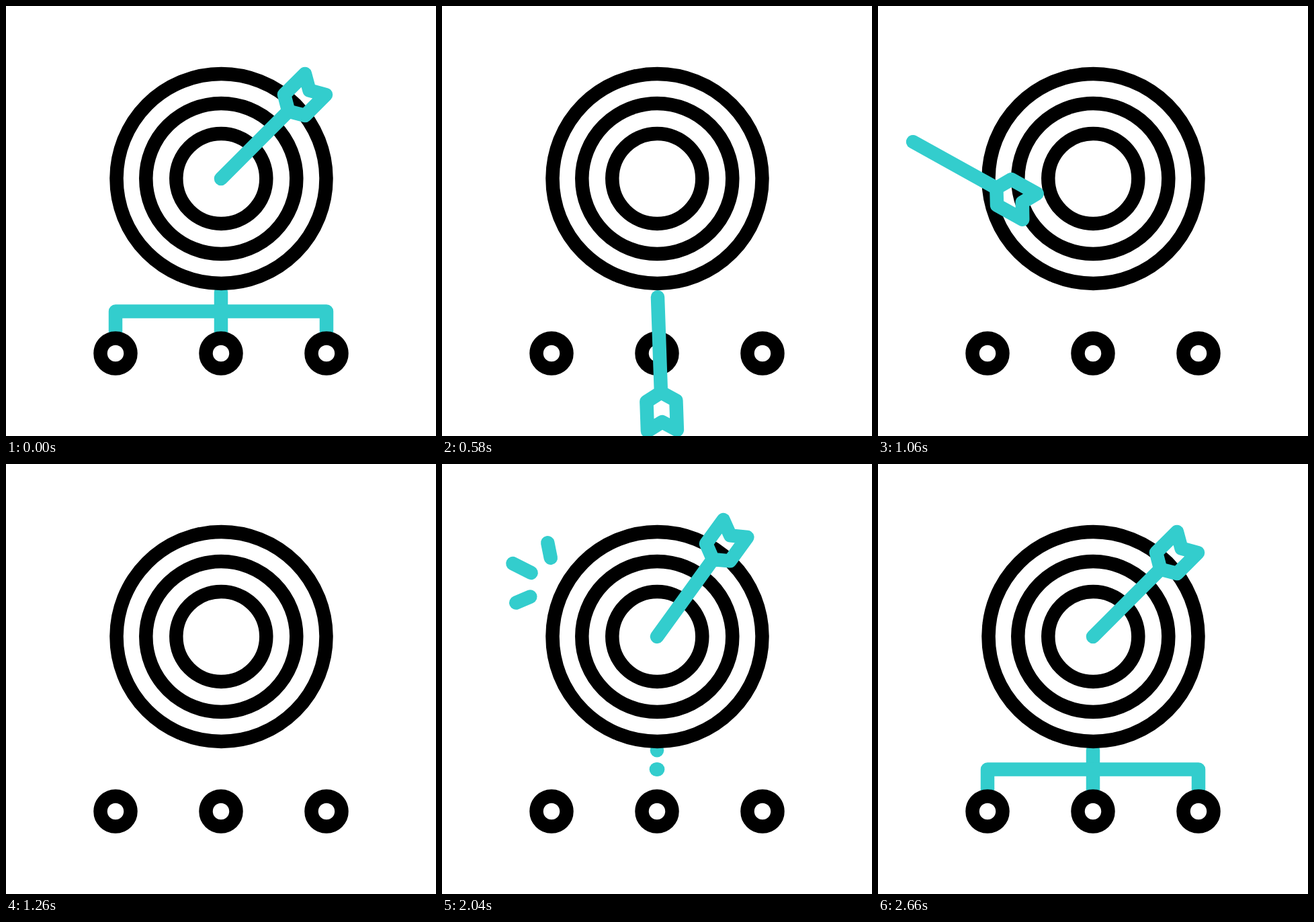
Recreate the animation shown at these times as an HTML page. Size 640 px wide and 640 px high, loop 3 s.

```html
<!DOCTYPE html>
<html lang="en">
<head>
<meta charset="utf-8">
<title>Target and arrow</title>
<style>
  html, body { margin: 0; width: 100%; height: 100%; overflow: hidden; background: #fff; }
  svg { display: block; width: 100%; height: 100%; }
  g { fill: none; stroke-width: 20.5; stroke-linecap: round; stroke-linejoin: round; }
  .teal { stroke: #33cdcd; }
  .black { stroke: #000; }
</style>
</head>
<body>
<svg viewBox="0 0 640 640">
  <g class="teal" id="links">
    <path d="M320 426V486"/>
    <path d="M320 454.5H163V486"/>
    <path d="M320 454.5H477V486"/>
  </g>
  <g class="teal" id="sparks"><line/><line/><line/></g>
  <g class="black">
    <circle cx="320.5" cy="257" r="156"/>
    <circle cx="320.3" cy="257" r="112"/>
    <circle cx="320.3" cy="257" r="67"/>
    <circle cx="163" cy="517" r="22.5"/>
    <circle cx="320" cy="517" r="22.5"/>
    <circle cx="477" cy="517" r="22.5"/>
  </g>
  <g class="teal" id="arrow">
    <path d="M0 0H142L155 22H198.7L186 0L198.7 -22H155L142 0"/>
  </g>
</svg>
<script>
const LOOP = 3000;
const arrow = document.getElementById('arrow');
const links = [...document.querySelectorAll('#links path')];
const sparks = [...document.querySelectorAll('#sparks line')];
const lengths = links.map(p => p.getTotalLength());
const rays = [[-101.3, 112], [207, 135], [156.9, 112]]; // angle, outer radius

const RAD = Math.PI / 180;
const part = (t, a, b) => Math.min(1, Math.max(0, (t - a) / (b - a)));
const ease = p => (1 - Math.cos(Math.PI * p)) / 2;
const show = (el, on) => el.setAttribute('visibility', on ? 'visible' : 'hidden');

// Tip position and rotation of the arrow, or null while it is off stage
function arrowPose(t) {
  if (t < 705) { // swings down, then drops
    const fall = Math.max(0, t - 315);
    const turn = ease(part(t, 0, 630));
    return [320 + turn, 257 + 0.00249 * fall * fall, -45 + 135 * turn];
  }
  if (t < 1260) { // misses, crossing to the upper left
    const p = part(t, 690, 1250);
    const x = 650 - 850 * (p + ease(p)) / 2;
    return [x, 396 + (x - 402) * 0.554, 29];
  }
  if (t < 1610) return null;
  const hit = 1896;
  if (t < hit) { // arcs in to the centre
    const x = 320 + (hit - t) * 1.195;
    const d = x - 556;
    return [x, 178.3 + 0.00141 * d * d, Math.atan(0.00282 * d) / RAD];
  }
  const s = t - hit; // quivers to rest
  const swing = 11.3 * Math.max(0, 1 - s / 750);
  return [320, 257, -45 + swing * Math.cos(Math.PI * s / 142)];
}

function drawLinks(t) {
  const f = t < 1000 ? 1 - ease(part(t, 0, 570)) : ease(part(t, 2010, 2640));
  links.forEach((p, i) => {
    show(p, f > 0);
    p.setAttribute('stroke-dasharray', f < 1 ? `${f * lengths[i]} 999` : 'none');
  });
}

function drawSparks(t) {
  const head = ease(part(t, 1940, 2200));
  const tail = ease(part(t, 2050, 2340));
  sparks.forEach((line, i) => {
    const [angle, outer] = rays[i];
    show(line, head > 0 && tail < 1);
    [tail, head].forEach((f, n) => {
      const r = 42 + (outer - 42) * f;
      line.setAttribute('x' + (n + 1), 170 + r * Math.cos(angle * RAD));
      line.setAttribute('y' + (n + 1), 181 + r * Math.sin(angle * RAD));
    });
  });
}

function draw(t) {
  const pose = arrowPose(t);
  show(arrow, pose);
  if (pose) arrow.setAttribute('transform', `translate(${pose[0]} ${pose[1]}) rotate(${pose[2]})`);
  drawLinks(t);
  drawSparks(t);
}

const start = performance.now();
function tick() {
  draw((performance.now() - start) % LOOP);
  requestAnimationFrame(tick);
}
tick();
</script>
</body>
</html>
```
